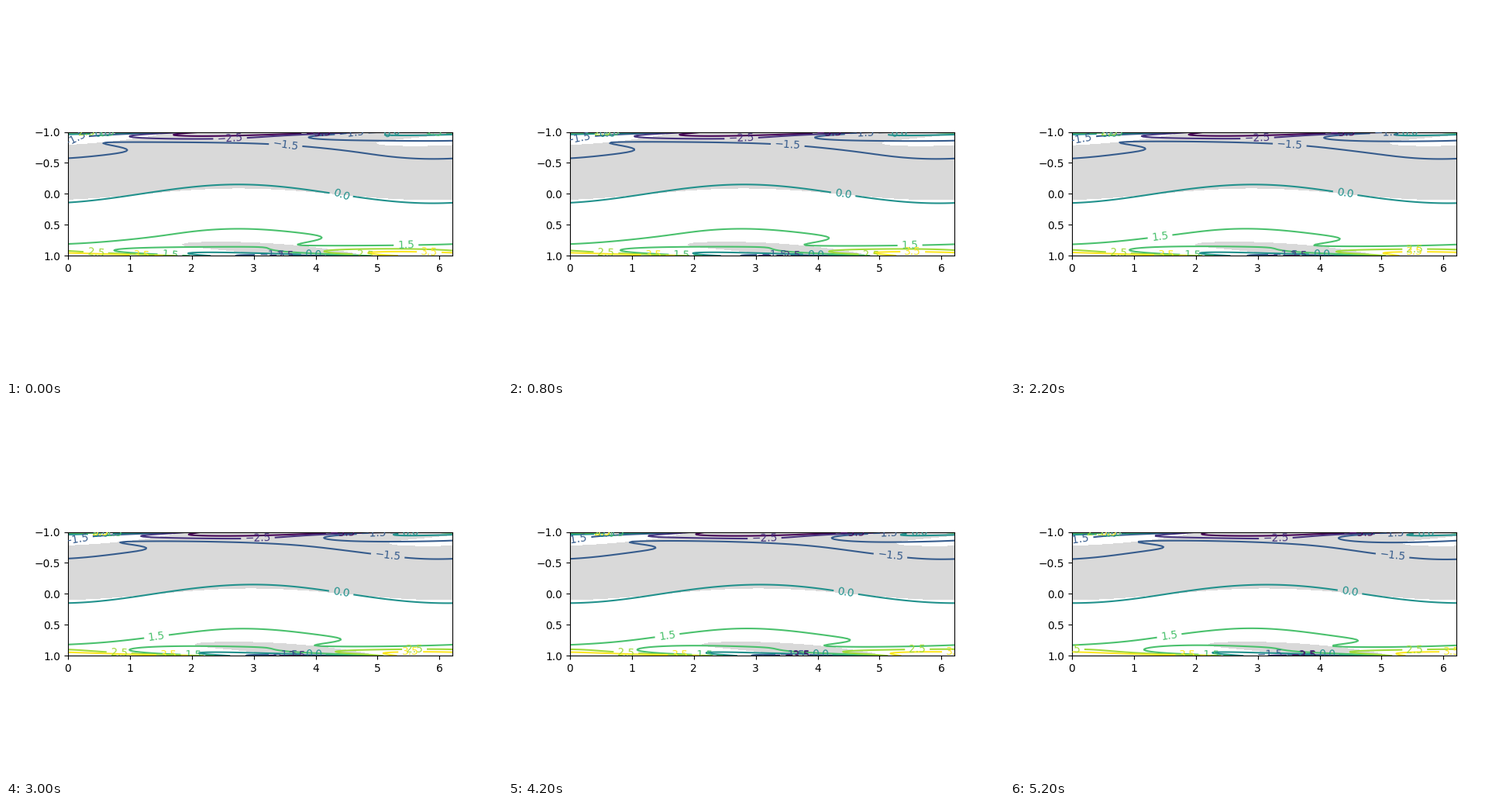
Animation, 640 px wide and 480 px high, one loop 5300 ms. Source, as a matplotlib script:

```python
import matplotlib.pyplot as plt
import numpy as np
from matplotlib.animation import FuncAnimation
from matplotlib.patches import Polygon

FRAMES, INTERVAL = 53, 100
NX, NY, MODES = 84, 64, 26
NU = 1 / 4000                 # viscosity
AMP, PHASE = 0.3, 2.75        # size and crest of the wave at mid-channel
STEPS = 5                     # time steps per frame
DT = 0.025 / STEPS
DRIFT = 0.0068                # travel of the shading per frame, radians
LEVELS = [-3.5, -2.5, -1.5, 0, 1.5, 2.5, 3.5]
SHADE = (217 / 255,) * 3


def chebyshev(n):
    """Differentiation matrix and nodes."""
    y = np.cos(np.pi * np.arange(n + 1) / n)
    c = np.ones(n + 1)
    c[[0, -1]] = 2
    c *= (-1.0) ** np.arange(n + 1)
    gap = y[:, None] - y[None, :] + np.eye(n + 1)
    d = np.outer(c, 1 / c) / gap
    return d - np.diag(d.sum(axis=1)), y


x = 2 * np.pi * np.arange(NX) / NX
d, y = chebyshev(NY)
d2 = d @ d
inner = slice(1, -1)
eye = np.eye(NY - 1)
scale = np.zeros(NY + 1)
scale[inner] = 1 / (1 - y[inner] ** 2)
d4 = (np.diag(1 - y ** 2) @ d2 @ d2 - 8 * np.diag(y) @ d2 @ d
      - 12 * d2) @ np.diag(scale)
d2i, d4i = d2[inner, inner], d4[inner, inner]
wave = np.arange(MODES + 1)[:, None]


def laplacian(k):
    return d2i - k ** 2 * eye


def bilaplacian(k):
    return d4i - 2 * k ** 2 * d2i + k ** 4 * eye


def unstable_mode():
    """Leading Orr-Sommerfeld stream function with unit mid-channel vorticity."""
    lap = laplacian(1)
    op = (NU * bilaplacian(1) - 2j * eye
          - 1j * np.diag(1 - y[inner] ** 2) @ lap)
    lam, vec = np.linalg.eig(np.linalg.solve(lap, op))
    phi = np.zeros(NY + 1, complex)
    phi[inner] = vec[:, np.argmax(lam.real)]
    return phi / (phi - d2 @ phi)[NY // 2]


def to_grid(c):
    return np.fft.irfft(c, n=NX, axis=0) * NX


def simulate():
    """Vorticity of a channel flow carrying a finite wave, one field per frame."""
    psi = np.zeros((MODES + 1, NY + 1), complex)
    psi[1] = AMP / 2 * unstable_mode() * np.exp(-1j * PHASE)
    mean = 1 - y ** 2
    solve = np.array([np.linalg.inv(laplacian(k) - DT * NU * bilaplacian(k))
                      for k in range(1, MODES + 1)])
    solve_mean = np.linalg.inv(eye - DT * NU * d2i)
    fields, old = [], None

    for step in range((FRAMES - 1) * STEPS + 1):
        zeta = psi @ d2.T - wave ** 2 * psi
        zeta[0] = d @ mean
        z = to_grid(zeta)
        if step % STEPS == 0:
            fields.append(-z.T)

        u_hat = psi @ d.T
        u_hat[0] = mean
        u, v = to_grid(u_hat), to_grid(-1j * wave * psi)
        adv = -(u * to_grid(1j * wave * zeta) + v * to_grid(zeta @ d.T))
        force = np.fft.rfft(adv, axis=0)[:MODES + 1] / NX
        force[0] = 2 * NU - (v * z).mean(axis=0)
        push = force if old is None else 1.5 * force - 0.5 * old
        old = force

        rhs = zeta[1:, inner] + DT * push[1:, inner]
        psi[1:, inner] = np.einsum("kij,kj->ki", solve, rhs)
        mean[inner] = solve_mean @ (mean + DT * push[0].real)[inner]
    return fields


# finer rows for smooth contours
y_fine = np.cos(np.linspace(0, np.pi, 2 * NY + 1))
refine = (np.polynomial.chebyshev.chebvander(y_fine, NY)
          @ np.linalg.inv(np.polynomial.chebyshev.chebvander(y, NY)))
frames = [refine @ field for field in simulate()]

fig, ax = plt.subplots(figsize=(6.4, 4.8), dpi=100)


def slanted_patch():
    """Tongue of shading that leans down into the lower wall."""
    s = np.linspace(0, 1, 60)
    bulge = 0.06 * np.sin(np.pi * s).clip(0) ** 0.4
    axis = 0.82 + 0.19 * s ** 2
    px = 1.85 + 2.9 * s
    upper = np.column_stack([px, axis - bulge])
    lower = np.column_stack([px, axis + bulge * (1 + 2 * s)])
    return np.vstack([upper, lower[::-1]])


PATCH = slanted_patch()


def fill(points, color):
    ax.add_patch(Polygon(points, closed=True, facecolor=color,
                         edgecolor="none", antialiased=False))


def shade(k):
    middle = -0.093 * np.cos(x - PHASE - DRIFT * k)
    band = np.column_stack([x, middle])
    fill(np.vstack([band, [(x[-1], -1), (0, -1)]]), SHADE)
    patch = PATCH + (DRIFT * k, 0)
    fill(patch, SHADE)
    # the upper wall shows the same patch half a wave away, cut out
    for shift in (np.pi, -np.pi):
        fill(patch * (1, -1) + (shift, 0), "white")


def draw(k):
    ax.clear()
    ax.set_aspect("equal")
    ax.set_xlim(0, x[-1])
    ax.set_ylim(1, -1)
    shade(k)
    ax.clabel(ax.contour(x, y_fine, frames[k], levels=LEVELS))
    return []


anim = FuncAnimation(fig, draw, frames=FRAMES, interval=INTERVAL,
                     repeat=True, repeat_delay=0, blit=False)
plt.show()
```
